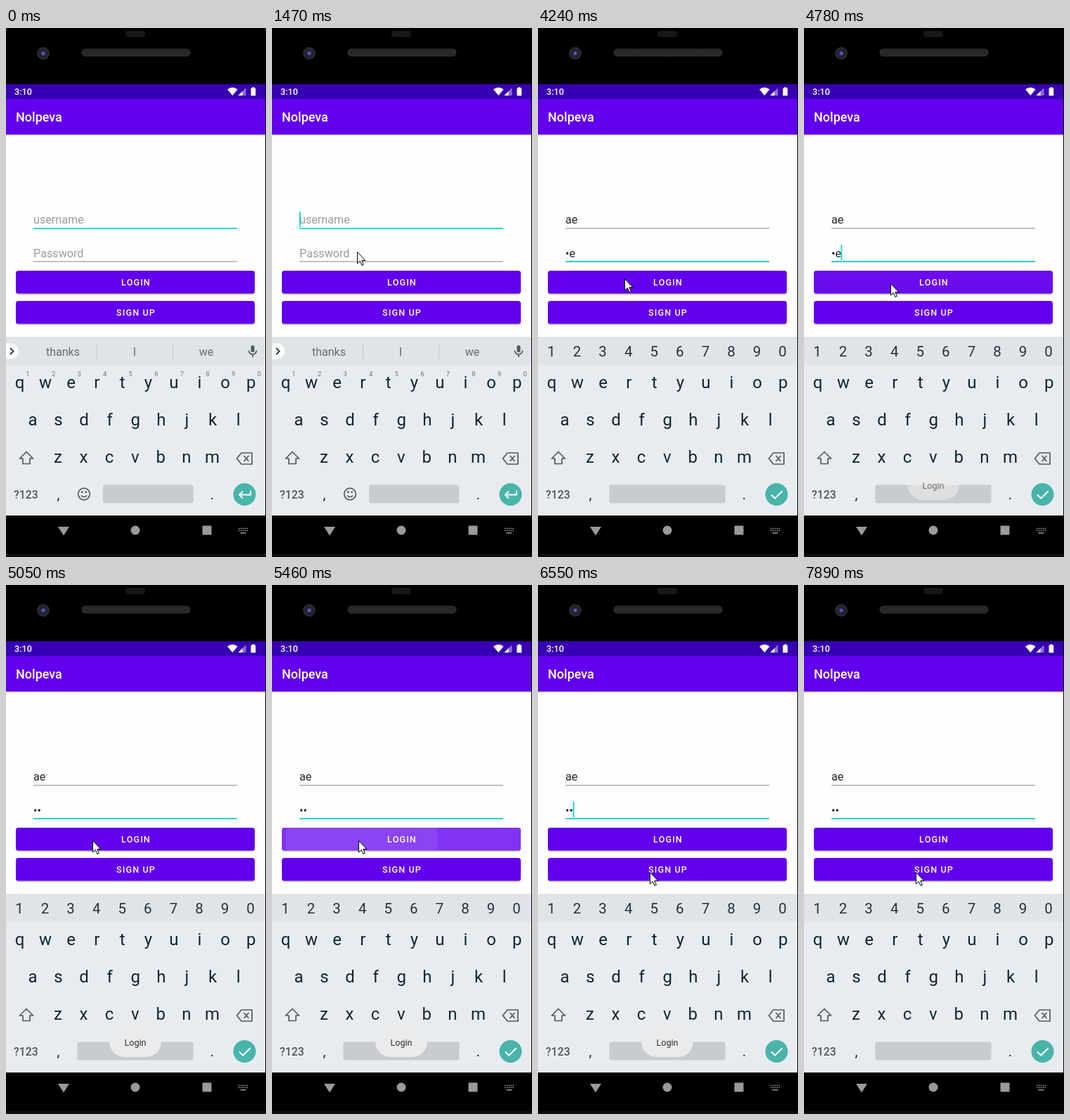
Write an HTML page that moves like this. It is 370 by 752 pixels and loops after 8 s.

```html
<!DOCTYPE html>
<html lang="en">
<head>
<meta charset="utf-8">
<title>Login screen</title>
<style>
html, body { margin: 0; width: 100%; height: 100%; overflow: hidden; background: #000; }
svg { display: block; width: 370px; height: 752px; font-family: Roboto, sans-serif; }
.mid { text-anchor: middle; }
.title { font: 500 18px Roboto, sans-serif; fill: #fff; }
.clock { font: 500 12.6px Roboto, sans-serif; fill: #fff; }
.button { font: 500 12.6px Roboto, sans-serif; letter-spacing: 1.12px; fill: #fff; }
.field { font-size: 16.2px; fill: #262626; }
.hint { font-size: 16.2px; fill: #9c9c9c; }
.composing { text-decoration: underline; text-decoration-thickness: 1px; }
.key { font-size: 24px; fill: #10262d; }
.digit { font-size: 20.5px; fill: #263238; }
.mini { font-size: 9.5px; fill: #6d777c; }
.word { font-size: 16px; fill: #626c71; }
.best { font-weight: 700; fill: #000; }
.mode { font: 500 15.8px Roboto, sans-serif; fill: #4c575c; }
.toast { font-size: 12.6px; fill: #303030; }
.icon { fill: none; stroke: #4f5a5f; stroke-width: 1.7; }
.white { fill: none; stroke: #fff; stroke-width: 2; }
.caret { fill: #03dac5; }
</style>
</head>
<body>
<svg viewBox="0 0 370 752">
  <defs>
    <clipPath id="loginClip"><rect x="14" y="345" width="340" height="32.5" rx="3.5"/></clipPath>
    <pattern id="mesh" width="4" height="4" patternUnits="userSpaceOnUse">
      <rect width="4" height="4" fill="#303030"/><path d="M0 0h2v2H0zM2 2h2v2H2z" fill="#1f1f1f"/>
    </pattern>
    <radialGradient id="lens">
      <stop offset="0" stop-color="#8b92d8"/><stop offset=".35" stop-color="#3b3f83"/><stop offset="1" stop-color="#11121f"/>
    </radialGradient>
    <linearGradient id="fall" x2="0" y2="1">
      <stop stop-opacity=".22"/><stop offset="1" stop-opacity="0"/>
    </linearGradient>
  </defs>

  <!-- Phone body -->
  <rect width="370" height="752"/>
  <rect y="748" width="370" height="4" fill="#0d0d0f"/>
  <rect x="170" y="4" width="28" height="9" rx="4" fill="#17171a"/>
  <circle cx="53" cy="36" r="9" fill="#29292c"/>
  <circle cx="53" cy="36" r="5.5" fill="url(#lens)"/>
  <rect x="108" y="30" width="154" height="10" rx="4.5" fill="url(#mesh)" stroke="#3a3a3a" stroke-width=".8"/>

  <!-- App -->
  <rect y="80" width="369" height="359" fill="#fefefe"/>
  <rect y="80" width="369" height="21" fill="#3700b3"/>
  <rect y="101" width="369" height="50.5" fill="#6200ee"/>
  <rect y="151.5" width="369" height="2" fill="url(#fall)"/>
  <text class="clock" x="12" y="95.3">3:10</text>
  <path d="M315 87.3q7.3-5.4 14.6 0L322.3 96z" fill="#fff"/>
  <path d="M341.500 85v11h-11z" fill="#8b6ed2"/>
  <path d="M336.500 90v6h-6z" fill="#fff"/>
  <path d="M350.300 84.200h3.200v1.300h1.700v10.700h-6.700V85.500h1.800z" fill="#fff"/>
  <text class="title" x="14" y="133">Nolpeva</text>

  <rect x="39" y="284.300" width="290" height="1" fill="#858585"/>
  <rect x="39" y="331.500" width="290" height="1" fill="#858585"/>
  <rect id="userLine" x="39" y="284" width="290" height="1.800" fill="#1ad9c5"/>
  <rect id="passLine" x="39" y="331.300" width="290" height="1.800" fill="#1ad9c5"/>
  <text id="userHint" class="hint" x="39" y="278">username</text>
  <text id="userA" class="field composing" x="39" y="278">a</text>
  <text id="userAe" class="field composing" x="39" y="278">ae</text>
  <text id="userDone" class="field" x="39" y="278">ae</text>
  <text id="passHint" class="hint" x="39" y="325.500">Password</text>
  <text id="passA" class="field" x="39" y="325.500">a</text>
  <text id="passDotE" class="field" x="39" y="325.500">•e</text>
  <text id="passDots" class="field" x="39" y="325.500">••</text>
  <g id="carets"></g>

  <g id="buttons"></g>
  <g clip-path="url(#loginClip)" fill="#fff">
    <rect id="glow" x="14" y="345" width="340" height="33"/>
    <circle id="ripple" cx="123" cy="361" r="102"/>
  </g>
  <text class="button mid" x="185" y="366">LOGIN</text>
  <text class="button mid" x="185" y="409">SIGN UP</text>

  <!-- Keyboard -->
  <rect y="439" width="369" height="254" fill="#e8ecf0"/>
  <rect y="439" width="369" height="40" fill="#e0e4e8"/>
  <g id="letters"></g>
  <path class="icon" d="M29 602.500l9.500 9.500h-4.500v7.500h-10V612h-4.500z" stroke-linejoin="round"/>
  <path class="icon" d="M335 604h15v16h-15l-6.500-8zM338.500 608l7 8m0-8l-7 8" stroke-linejoin="round"/>
  <text class="mode" x="11" y="668.500">?123</text>
  <text class="key mid" x="74.500" y="670" style="font-size:20px">,</text>
  <text class="key mid" x="293.500" y="670" style="font-size:20px">.</text>
  <circle cx="339.500" cy="663" r="16" fill="#49b4aa"/>

  <g id="textMode">
    <path d="M0 448.500h7a11 11 0 0 1 0 22H0z" fill="#fff"/>
    <path d="M6 455l4.500 4.500L6 464" fill="none" stroke="#263238" stroke-width="1.800"/>
    <path d="M129.500 448.500v22M237.500 448.500v22" stroke="#c3c8cb"/>
    <rect x="348.500" y="451" width="5" height="10" rx="2.500" fill="#4f5a5f"/>
    <path class="icon" d="M345.500 458.500a5.500 5.500 0 0 0 11 0M351 464v4" stroke-width="1.500"/>
    <circle class="icon" cx="111" cy="662.500" r="8.300"/>
    <path class="icon" d="M107 664.500q4 4.500 8 0" stroke-width="1.500"/>
    <path d="M107 658.500h2.500v2.500H107zM112.500 658.500h2.500v2.500h-2.500z" fill="#4f5a5f"/>
    <rect x="138" y="649.500" width="128.500" height="26" rx="3" fill="#c8ccd0"/>
    <path class="white" d="M348 657.500v6h-16M337 658.500l-5 5 5 5"/>
    <g id="words"></g>
  </g>
  <g id="passMode">
    <rect x="101.500" y="649.500" width="165" height="26" rx="3" fill="#c8ccd0"/>
    <path class="white" d="M332 663.500l5.200 5.200 10.500-10.500"/>
  </g>

  <!-- Navigation bar -->
  <g fill="#9a9a9a">
    <path d="M74 709h16l-8 12.500z"/>
    <circle cx="184" cy="714" r="6.500"/>
    <rect x="279.500" y="707.500" width="13" height="13" rx="1"/>
    <path d="M331 711.500h13M331 714.500h13" stroke="#9a9a9a" stroke-width="1.600" stroke-dasharray="1.600 1.250"/>
    <path d="M333.500 717h8v1.500h-8z"/>
  </g>

  <g id="toast">
    <rect x="147" y="627.500" width="74" height="43.500" rx="21.700" fill="#ebebeb"/>
    <text class="toast mid" x="184" y="654.500">Login</text>
  </g>
  <path id="pointer" d="M.5.500v16.500l3.800-3.600 2.600 6 2.500-1.100-2.600-5.800h5z" fill="#fff" stroke="#000"/>
</svg>

<script>
const LOOP = 8000;
const rules = [];
const byId = id => document.getElementById(id);
const add = (id, markup) => byId(id).insertAdjacentHTML('beforeend', markup);

// frames: [time in ms, declarations]
function track(id, frames, easing = 'linear') {
  const body = frames.map(([t, css]) => `${t / LOOP * 100}%{${css}}`).join('');
  rules.push(`@keyframes ${id}{${body}}#${id}{animation:${id} ${LOOP}ms ${easing} infinite}`);
}
const fade = (id, frames, easing) => track(id, frames.map(([t, o]) => [t, `opacity:${o}`]), easing);
const show = (id, ...spans) =>
  fade(id, [...(spans[0][0] ? [[0, 0]] : []), ...spans.flatMap(([from, to]) => [[from, 1], [to, 0]])], 'step-end');

// Keyboard letters, with digits either as small marks or as a row of their own
const PITCH = 36.57;
[['qwertyuiop', 19.5, 512], ['asdfghjkl', 38, 565], ['zxcvbnm', 74, 617.5]].forEach(([row, x, y]) =>
  [...row].forEach((c, i) => add('letters', `<text class="key mid" x="${x + i * PITCH}" y="${y}">${c}</text>`)));
[...'1234567890'].forEach((c, i) => {
  add('textMode', `<text class="mini mid" x="${31 + i * PITCH}" y="495">${c}</text>`);
  add('passMode', `<text class="digit mid" x="${19 + i * PITCH}" y="467.300">${c}</text>`);
});

const suggestions = (id, words, best, span) => {
  add('words', `<g id="${id}">` + words.map((w, i) =>
    `<text class="word mid ${w === best ? 'best' : ''}" x="${[81, 183, 285][i]}" y="465.500">${w}</text>`).join('') + '</g>');
  show(id, span);
};
suggestions('wordsStart', ['thanks', 'I', 'we'], '', [0, 1770]);
suggestions('wordsA', ['as', 'a', 'and'], 'a', [1770, 2300]);
suggestions('wordsAe', ['ae', 'we', 'AE'], 'we', [2300, 2960]);

for (const y of [345, 388]) {
  add('buttons', `<rect x="14" y="${y + 1.5}" width="340" height="32.500" rx="3.500" opacity=".22"/>
    <rect x="14" y="${y}" width="340" height="32.500" rx="3.500" fill="#6200ee"/>`);
}

const caret = (id, x, y, ...spans) => {
  add('carets', `<rect id="${id}" class="caret" x="${x}" y="${y}" width="1.800" height="22"/>`);
  show(id, ...spans);
};
caret('caretStart', 39, 261, [420, 900], [1470, 1750]);
caret('caretA', 47.5, 261, [1750, 2270]);
caret('caretAe', 56, 261, [2270, 2770]);
caret('caretPass', 39, 308, [2900, 3200]);
caret('caretPassA', 47.5, 308, [3200, 3450]);
caret('caretDotE', 52.5, 308, [3450, 3940], [4450, 4950]);
caret('caretDots', 49.7, 308, [5480, 5940], [6400, 6890], [7390, 7890]);

show('userHint', [0, 1750]);
show('userA', [1750, 2270]);
show('userAe', [2270, 2900]);
show('userDone', [2900, LOOP]);
show('passHint', [0, 3200]);
show('passA', [3200, 3450]);
show('passDotE', [3450, 4950]);
show('passDots', [4950, LOOP]);
show('userLine', [0, 2900]);
show('passLine', [2900, LOOP]);
show('textMode', [0, 2960]);
show('passMode', [2960, LOOP]);

// Two presses on LOGIN
fade('glow', [[0, 0], [4380, 0], [4450, .2], [4640, .2], [4810, 0],
  [5350, 0], [5430, .2], [5570, .2], [5740, 0], [LOOP, 0]]);
const ring = (cx, r, o) => `cx:${cx}px;r:${r}px;opacity:${o}`;
track('ripple', [[0, ring(123, 102, 0)], [4400, ring(123, 102, 0)], [4430, ring(127, 107, .09)],
  [4625, ring(184, 171, .09)], [4820, ring(184, 171, 0)], [4821, ring(123, 102, 0)],
  [5430, ring(123, 102, 0)], [5458, ring(126.5, 107, .09)], [5655, ring(184, 171, .09)],
  [5800, ring(184, 171, 0)], [LOOP, ring(184, 171, 0)]]);

// The second toast crossfades with the first
fade('toast', [[0, 0], [4660, 0], [4860, 1], [5550, 1], [5680, .78], [5820, 1],
  [7530, 1], [7800, 0], [LOOP, 0]]);

const at = (x, y, o = 1) => `transform:translate(${x}px,${y}px);opacity:${o}`;
track('pointer', [[0, at(316, 290, 0)], [399, at(316, 290, 0)], [400, at(316, 290)],
  [600, at(215, 308)], [760, at(142, 316)], [900, at(121, 318)], [2725, at(121, 318)],
  [2840, at(108, 313)], [3480, at(108, 313)], [3510, at(109, 315)], [3940, at(109, 315)],
  [4120, at(120, 345)], [4240, at(123, 356)], [4340, at(123, 363)], [5640, at(123, 363)],
  [5870, at(133, 401)], [6130, at(150, 416)], [6390, at(159, 419)], [6550, at(159, 408)],
  [LOOP, at(159, 408)]]);

document.head.insertAdjacentHTML('beforeend', `<style>${rules.join('')}</style>`);
</script>
</body>
</html>
```
